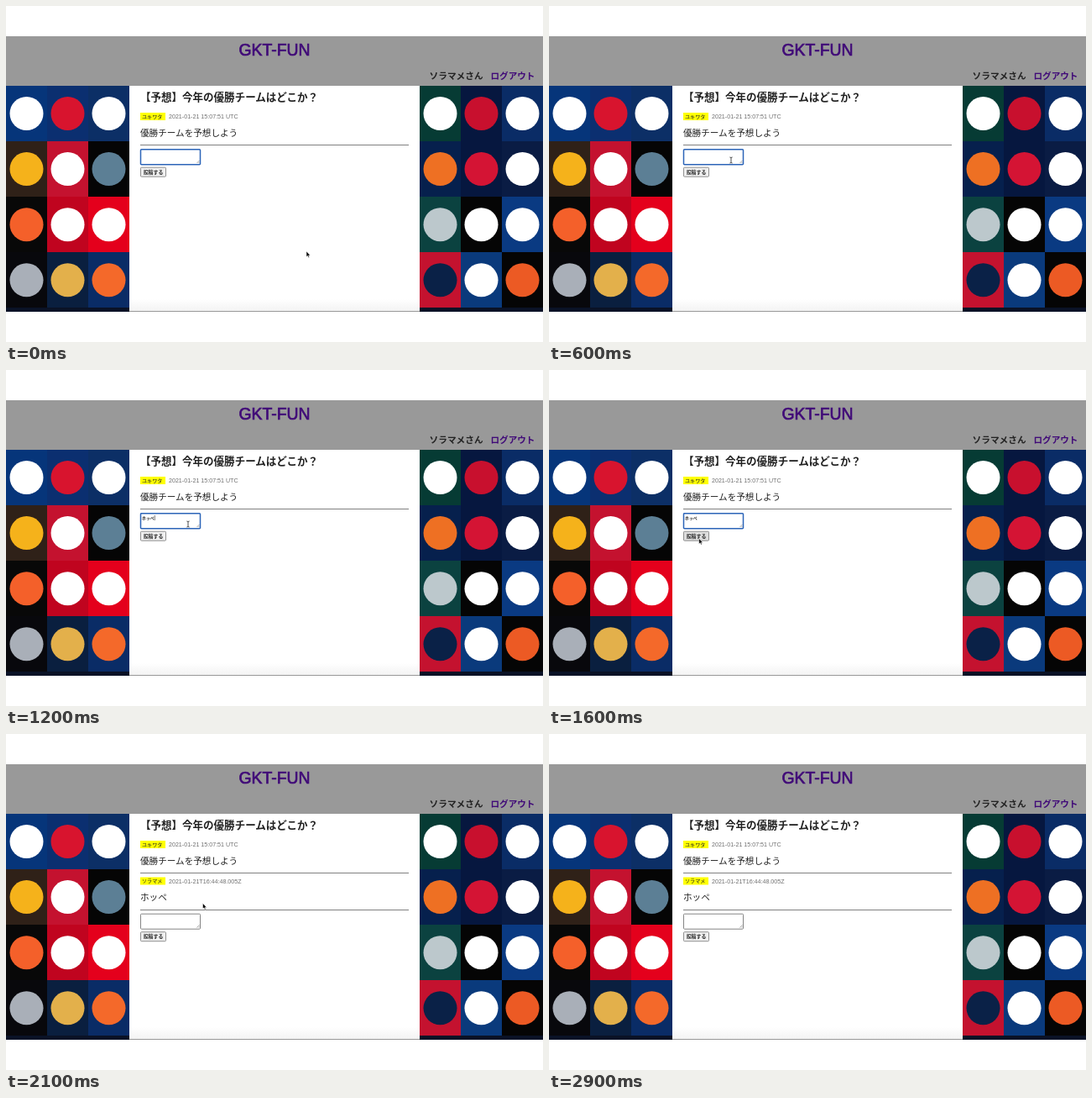
An HTML page that plays this animation: 640 by 400 pixels, repeating every 3000 ms.

```html
<!DOCTYPE html>
<html lang="ja">
<head>
<meta charset="utf-8">
<style>
  html, body { margin: 0; width: 100%; height: 100%; overflow: hidden; background: #fff; }
  svg { display: block; width: 640px; height: 400px; }
  text { font-family: "Noto Sans CJK JP", "Noto Sans CJK", sans-serif; fill: #222; white-space: pre; }
  .latin { font-family: "Liberation Sans", sans-serif; }
  .bold { font-weight: 700; }
  .link { fill: #400a78; }
  .title { font-size: 19.4px; stroke: #400a78; stroke-width: .7; }
  .date { font-size: 7.12px; fill: #707070; }
  .tag { font-size: 6.1px; font-weight: 500; }
  .body { font-size: 10.6px; }
  .rule { stroke: #808080; }
  #tiles rect { shape-rendering: crispEdges; }
</style>
</head>
<body>
<svg viewBox="0 0 640 400">
  <linearGradient id="shade" x2="0" y2="1">
    <stop stop-color="#fff"/><stop offset="1" stop-color="#f3f3f3"/>
  </linearGradient>
  <rect y="36" width="640" height="59" fill="#999"/>
  <text class="latin title link" x="320" y="59" text-anchor="middle">GKT-FUN</text>
  <text class="bold" x="504.5" y="86.5" font-size="10.7">ソラマメさん</text>
  <text class="bold link" x="577.5" y="86.5" font-size="10.6">ログアウト</text>
  <g id="tiles"></g>
  <rect x="147" y="349" width="346" height="14" fill="url(#shade)"/>
  <path d="M147 363.5H493" stroke="#999"/>

  <text class="bold" x="160" y="113" font-size="12.52">【予想】今年の優勝チームはどこか？</text>
  <rect x="160" y="127" width="30" height="9" fill="#ff0"/>
  <text class="tag" x="162" y="133.8">ユキワタ</text>
  <text class="latin date" x="194" y="134">2021-01-21 15:07:51 UTC</text>
  <text class="body" x="160" y="154.8">優勝チームを予想しよう</text>
  <path class="rule" d="M160 165.5H480"/>

  <g id="comment">
    <rect x="160" y="170.5" width="30" height="9" fill="#ff0"/>
    <text class="tag" x="162" y="177.3">ソラマメ</text>
    <text class="latin date" x="194" y="177.5">2021-01-21T16:44:48.005Z</text>
    <text class="body" x="160" y="198.3">ホッペ</text>
    <path class="rule" d="M160 209.5H480"/>
  </g>

  <g id="form">
    <rect id="field" x="160.5" y="170.7" width="71" height="18" rx="1" fill="#fff"/>
    <path d="M227.5 187l3-3M229.5 187l1-1" stroke="#666" stroke-width=".6"/>
    <text id="typed" class="bold" x="162" y="177.8" font-size="4.9"></text>
    <path id="caret" d="M0 173v6" stroke="#222" stroke-width=".6"/>
    <rect id="button" x="160.5" y="192.2" width="30" height="11" rx="1" stroke="#777" stroke-width=".8"/>
    <text class="bold" x="175.5" y="199.8" font-size="5.9" text-anchor="middle">投稿する</text>
  </g>

  <path id="arrow" d="M0 0v6.6l1.5-1.3 1 2.3 1.1-.5-1-2.2h2z" stroke="#fff" stroke-width=".5"/>
  <path id="beam" d="M-1.6-3.5Q0-3.5 0-2.5Q0-3.5 1.6-3.5M0-2.5V2.5M-1.6 3.5Q0 3.5 0 2.5Q0 3.5 1.6 3.5" fill="none" stroke="#222" stroke-width=".8"/>
</svg>
<script>
const $ = id => document.getElementById(id);

// Each tile: background, mark colour.
const leftTiles = `
  #06357a #fff, #0b2f70 #d8142e, #0c2f66 #fff,
  #2f2118 #f5b21b, #c4122f #fff, #050505 #5c7f95,
  #080808 #f4602a, #c0041f #fff, #e4001c #fff,
  #08080c #a9afb8, #0a1f3f #e3b04b, #0a2c66 #f4692a`;
const rightTiles = `
  #063b34 #fff, #06173f #c8102e, #0a2c66 #fff,
  #06204d #ee7023, #06173f #d41434, #0a1c44 #fff,
  #0b4240 #bcc8cc, #050505 #fff, #0a3a82 #fff,
  #c4122f #0a2147, #0a3a7c #fff, #050505 #ec5a24`;

function drawTiles(left, list) {
  return list.split(',').map((pair, i) => {
    const [back, mark] = pair.trim().split(' ');
    const x = left + i % 3 * 49, y = 95 + Math.floor(i / 3) * 66.1;
    return `<rect x="${x}" y="${y}" width="49" height="66.1" fill="${back}"/>
      <circle cx="${x + 24.5}" cy="${y + 33}" r="20" fill="${mark}"/>`;
  }).join('');
}
$('tiles').innerHTML =
  '<path d="M0 359H147V364H0zM493 359H640V364H493z" fill="#0a1226"/>' +
  drawTiles(0, leftTiles) + drawTiles(493, rightTiles);

// Pointer stops: time, x, y.
const stops = [[0, 358, 292], [100, 358, 292], [500, 217, 183.5], [1200, 217, 183.5],
               [1600, 178.7, 200.5], [1800, 178.7, 200.5], [2100, 234.5, 201.5], [3000, 234.5, 201.5]];

function pointerAt(t) {
  const i = stops.findIndex(s => s[0] > t);
  const [t0, x0, y0] = stops[i - 1], [t1, x1, y1] = stops[i];
  const u = (t - t0) / (t1 - t0), k = u * u * (3 - 2 * u);
  return [x0 + (x1 - x0) * k, y0 + (y1 - y0) * k];
}

const show = (id, on) => $(id).setAttribute('visibility', on ? 'visible' : 'hidden');
const set = (id, name, value) => $(id).setAttribute(name, value);

function draw(t) {
  const sent = t >= 1800;
  show('comment', sent);
  set('form', 'transform', `translate(0 ${sent ? 43.5 : 0})`);
  set('field', 'stroke', sent ? '#858585' : '#2c64b8');
  set('field', 'stroke-width', sent ? 1 : 1.5);
  set('button', 'fill', t >= 1500 && !sent ? '#ddd' : '#efefef');

  const count = Math.max(0, Math.min(3, Math.floor((t - 700) / 100)));
  const text = sent ? '' : (t < 1100 ? 'ほっぺ' : 'ホッペ').slice(0, count);
  $('typed').textContent = text;
  set('caret', 'transform', `translate(${162.6 + text.length * 4.9} 0)`);
  show('caret', t >= 800 && t < 1300);

  const [x, y] = pointerAt(t);
  const overField = x > 160 && x < 232 && y > 170 && y < 190;
  set('arrow', 'transform', `translate(${x} ${y})`);
  set('beam', 'transform', `translate(${x} ${y})`);
  show('arrow', !overField && t < 2300);
  show('beam', overField);
}

function tick() {
  draw(Math.floor(performance.now() % 3000 / 100) * 100);
  requestAnimationFrame(tick);
}
tick();
</script>
</body>
</html>
```
